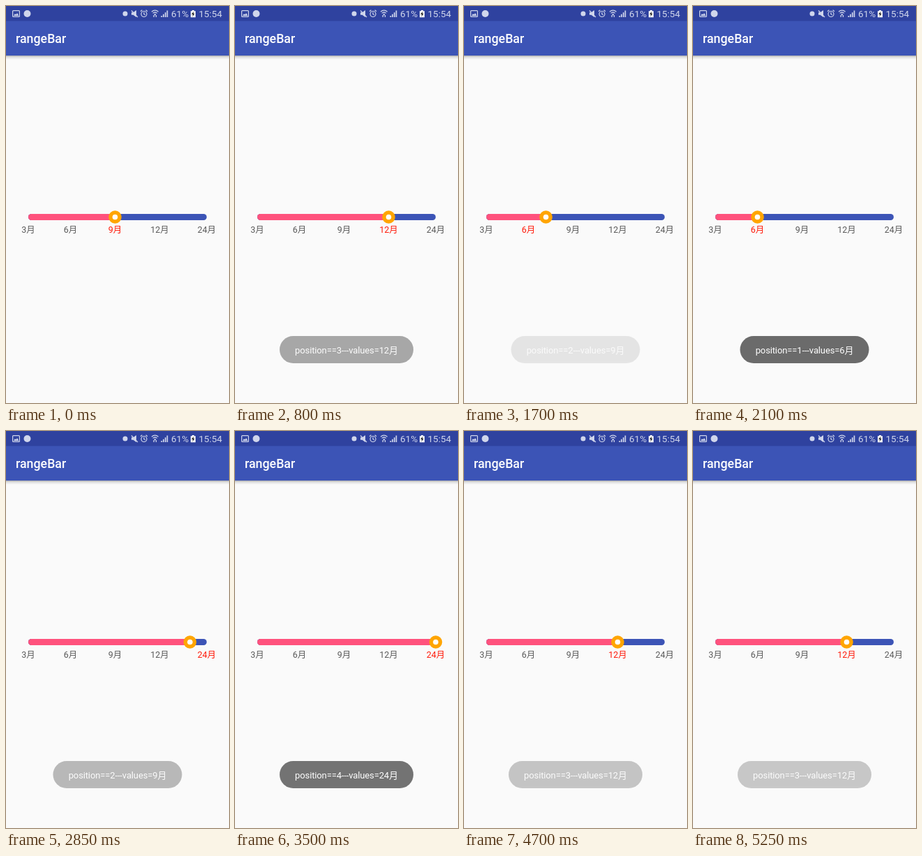
These frames come from a looping animation (320 px wide and 569 px high, 5.3 s). An HTML page:

```html
<!DOCTYPE html>
<html lang="zh">
<head>
<meta charset="utf-8">
<title>rangeBar</title>
<style>
  html, body { margin: 0; height: 100%; overflow: hidden; background: #fafafa; }
  svg { display: block; width: 100vw; height: 100vh; }
  text { font-family: Roboto, "Noto Sans CJK SC", "Noto Sans CJK", sans-serif; }
  .status text { font-size: 13.5px; }
  .labels text { font-size: 12.5px; text-anchor: middle; }
  .toast text { font-size: 13px; letter-spacing: -.13px; text-anchor: middle; fill: #fff; }
</style>
</head>
<body>
<svg viewBox="0 0 320 569">
  <defs>
    <linearGradient id="shade" x2="0" y2="1">
      <stop stop-color="#000" stop-opacity=".3"/>
      <stop offset=".4" stop-color="#000" stop-opacity=".1"/>
      <stop offset="1" stop-color="#000" stop-opacity="0"/>
    </linearGradient>
  </defs>
  <rect width="320" height="569" fill="#fafafa"/>
  <rect y="71" width="320" height="6" fill="url(#shade)"/>
  <rect width="320" height="71" fill="#3c54b6"/>
  <rect width="320" height="21.5" fill="#2f429f"/>
  <text x="14" y="53" font-size="17.8" font-weight="500" fill="#fff">rangeBar</text>

  <g class="status" fill="#d0d6ec">
    <g fill="none" stroke="#d0d6ec" stroke-width="1.2">
      <rect x="9.6" y="6.6" width="9.8" height="8.8" rx="1"/>
      <circle cx="198" cy="11.5" r="4"/>
      <path d="M198 9v2.7l1.8 1M193 7.7l2.4-2M203 7.7l-2.4-2"/>
      <path d="M209 8.2q4.800-4.300 9.600 0M210.700 10.400q3.100-2.800 6.200 0"/>
      <path d="M180 6.500l9 9.500"/>
    </g>
    <path d="M11 14l2-3 1.500 1.500 1.500-2.500 2.200 4z"/>
    <circle cx="30.500" cy="11" r="5"/>
    <circle cx="171" cy="11" r="3.500"/>
    <path d="M180 9.300h2.500l4.500-3.300v10l-4.500-3.300h-2.500z"/>
    <path d="M212.300 12l1.500-1.200 1.500 1.200-1.500 1.800zM211.500 13v3h1.300v-3zM214.800 13v3h1.300v-3z"/>
    <path d="M222.500 14h1.700v2h-1.700zM225.200 11.700h1.700v4.300h-1.700zM227.900 9.200h1.700v6.800h-1.700zM230.600 6.500h1.700v9.500h-1.700z"/>
    <text x="237" y="16">61%</text>
    <path d="M267 6h3v1.200h2v9h-7v-9h2z" fill="#fff"/>
    <path d="M269.500 7.500l-3.300 4.600h2l-.8 3.400 3.400-4.700h-2z" fill="#222"/>
    <text x="276.500" y="16">15:54</text>
  </g>

  <rect x="32" y="298" width="256" height="9" rx="4.500" fill="#3c54b6"/>
  <rect id="fill" x="32" y="298" height="9" rx="4.500" fill="#ff527d"/>
  <g id="thumb">
    <circle r="9.300" fill="#ffa502"/>
    <circle r="3.800" fill="#fff"/>
  </g>
  <g class="labels" id="labels"></g>
  <g id="toasts"></g>
</svg>
<script>
const NS = "http://www.w3.org/2000/svg", LOOP = 5300, STEP = 50;
const byId = id => document.getElementById(id);

function add(parent, tag, attrs, text = "") {
  const el = parent.appendChild(document.createElementNS(NS, tag));
  for (const k in attrs) el.setAttribute(k, attrs[k]);
  el.textContent = text;
  return el;
}

const months = ["3月", "6月", "9月", "12月", "24月"];
const stops = [32, 92.5, 156.5, 220.5, 288];
const labels = months.map((m, i) => add(byId("labels"), "text", { x: stops[i], y: 325 }, m));

// [start time, chosen stop]
const toasts = [[240, 3], [1085, 2], [1900, 1], [2797, 2], [3350, 4], [3808, 4], [4659, 3]]
  .map(([start, pos]) => {
    const g = add(byId("toasts"), "g", { class: "toast" });
    const w = pos > 2 ? 192 : 185;
    add(g, "rect", { x: 160 - w / 2, y: 473, width: w, height: 39, rx: 19.5, fill: "#6b6b6b" });
    add(g, "text", { x: 160, y: 498 }, `position==${pos}---values=${months[pos]}`);
    return { start, g };
  });

// Thumb drags: [time, x]
const drags = [[50, 156.5], [220, 216], [240, 220.5], [850, 220.5], [1050, 162], [1085, 156.5],
  [1490, 156.5], [1870, 86], [1900, 92.5], [2340, 92.5], [2700, 150], [2750, 156.5], [2790, 156.5],
  [2850, 264], [3000, 288], [4380, 288], [4640, 226], [4659, 220.5]];

function thumbAt(t) {
  const i = drags.findIndex(d => d[0] > t);
  if (i === 0) return drags[0][1];
  if (i < 0) return drags[drags.length - 1][1];
  const [t0, x0] = drags[i - 1], [t1, x1] = drags[i];
  return x0 + (x1 - x0) * (t - t0) / (t1 - t0);
}

const unit = v => Math.min(1, Math.max(0, v));
const FADE = 200, SHOWN = 430;

function toastAlpha(age) {
  const fadeIn = 1 - (1 - unit(age / FADE)) ** 2;
  return fadeIn * (1 - unit((age - SHOWN) / FADE) ** 2);
}

function draw(t) {
  const x = thumbAt(t);
  byId("fill").setAttribute("width", x - 32);
  byId("thumb").setAttribute("transform", `translate(${x} 302.5)`);
  const dist = stops.map(s => Math.abs(s - x));
  const nearest = dist.indexOf(Math.min(...dist));
  labels.forEach((l, i) => l.setAttribute("fill", i === nearest ? "#ff1a0a" : "#5a5a5a"));
  toasts.forEach(({ start, g }) => g.setAttribute("opacity", toastAlpha(t - start)));
}

const begin = performance.now();
function tick() {
  const t = (performance.now() - begin) % LOOP;
  draw(Math.floor(t / STEP) * STEP);
  requestAnimationFrame(tick);
}
tick();
</script>
</body>
</html>
```
